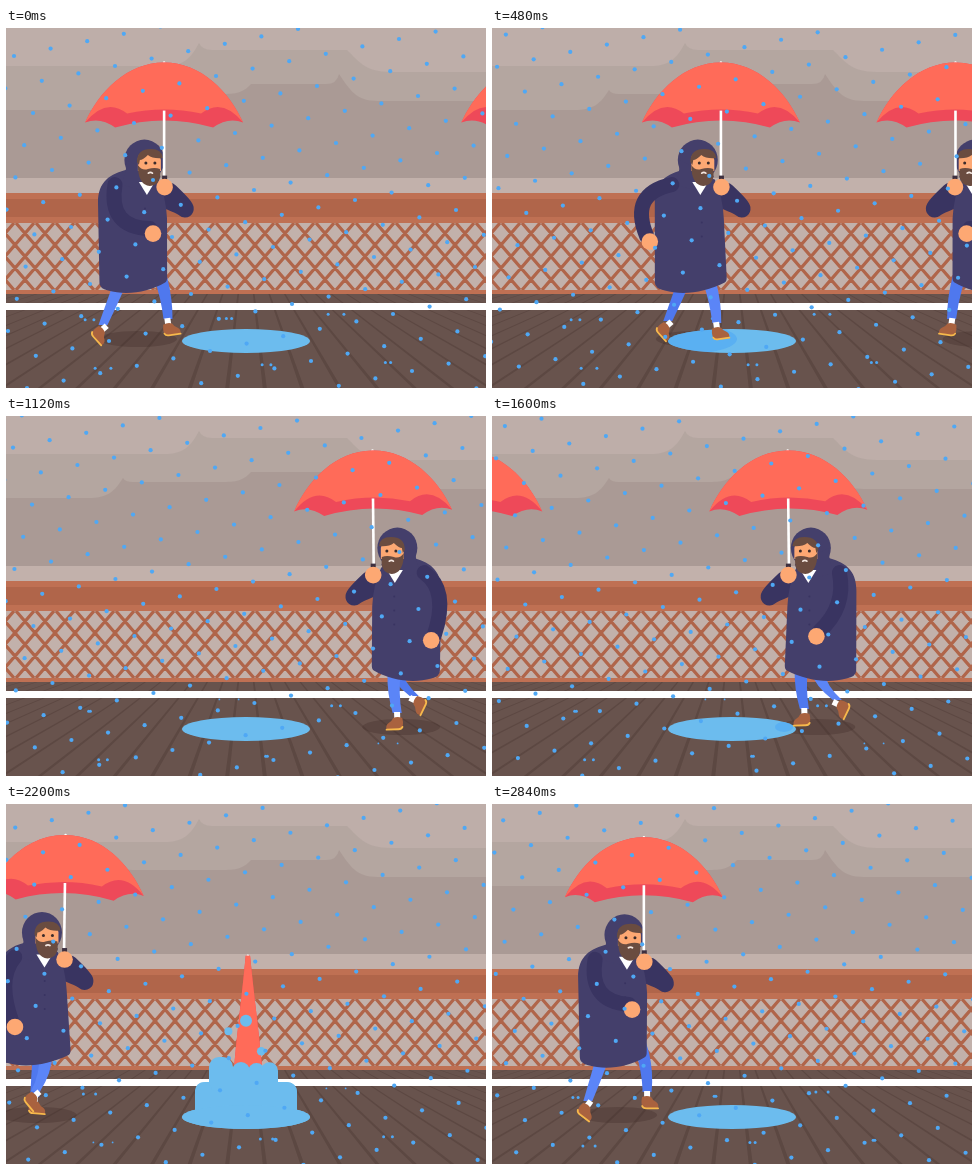
An HTML page with a canvas for the animation above (2.88 s loop, 480 by 360 pixels).

```html
<!DOCTYPE html>
<html lang="en">
<head>
<meta charset="utf-8">
<title>Rainy walk</title>
<style>
  html, body { margin: 0; width: 100%; height: 100%; overflow: hidden; background: #67534d; }
  canvas { display: block; width: 480px; height: 360px; }
</style>
</head>
<body>
<canvas id="stage" width="480" height="360"></canvas>
<script>
const ctx = document.getElementById('stage').getContext('2d');
const LOOP = 2880, FRAME = 40, CYCLE = 960, SPEED = 0.1475;
const WATER = '#6cbcee', RAIN = '#4fa8f5', COAT = '#443f6b', SLEEVE = '#393461',
      SKIN = '#fda873', HAIR = '#6a4c40', WOOD = '#b0654a', TRIM = '#bf7053';

const mod = (a, n) => ((a % n) + n) % n;
const clamp01 = x => Math.min(1, Math.max(0, x));
const lerp = (a, b, k) => a + (b - a) * k;
const smooth = x => { x = clamp01(x); return x * x * (3 - 2 * x); };
const wave = (u, period, shift = 0) => Math.cos(2 * Math.PI * (u - shift) / period);
const walkX = u => Math.min(158 + SPEED * u, 237);

function rect(x, y, w, h, color) {
  ctx.fillStyle = color;
  ctx.fillRect(x, y, w, h);
}
function oval(x, y, rx, ry, color) {
  ctx.fillStyle = color;
  ctx.beginPath();
  ctx.ellipse(x, y, rx, ry, 0, 0, 2 * Math.PI);
  ctx.fill();
}
const dot = (x, y, r, color) => oval(x, y, r, r, color);
function shape(d, color) {
  ctx.fillStyle = color;
  ctx.fill(new Path2D(d));
}
function line(d, width, color, cap = 'round') {
  ctx.lineWidth = width;
  ctx.strokeStyle = color;
  ctx.lineCap = cap;
  ctx.lineJoin = 'round';
  ctx.stroke(new Path2D(d));
}

// Piecewise linear lookup: rows are [time, v1, v2, ...].
function track(p, rows) {
  const i = rows.findIndex((row, n) => n > 0 && p <= row[0]);
  const a = rows[i - 1], b = rows[i], k = (p - a[0]) / (b[0] - a[0]);
  return a.slice(1).map((v, n) => lerp(v, b[n + 1], k));
}

function drawScene() {
  rect(0, 0, 480, 150, '#aa9a95');
  shape('M0 0H480V73H372C350 73 344 62 333 46Q331 56 320 56H245C236 66 228 66 212 66H127Q119 66 117 62C109 74 104 82 82 82H0Z', '#b4a6a0');
  shape('M0 0H480V44H385C358 44 352 32 341 22H206Q196 22 193 15C185 30 178 38 158 38H0Z', '#beaea9');
  rect(0, 150, 480, 115, '#c2b1ab');

  let mesh = '';
  for (let x = -70; x < 500; x += 20) mesh += `M${x} 195l58 67M${x + 58} 195l-58 67`;
  line(mesh, 3.3, WOOD, 'butt');
  rect(0, 165, 480, 30, TRIM);
  rect(0, 171, 480, 18, WOOD);
  rect(0, 262, 480, 5, TRIM);

  rect(0, 266, 480, 94, '#68534d');
  let seams = '';
  for (let i = -30; i <= 30; i++) {
    const top = 240 + (i + .5) * 15.5, bottom = 240 + (i + .5) * 37.5;
    seams += `M${top - .8} 266h1.6L${bottom + 2} 360h-4Z`;
  }
  shape(seams, 'rgba(58,42,38,.26)');
  rect(0, 275, 480, 7, '#fff');
}

function drawLeg(phase, bob, side, color) {
  const [x, y, turn] = track(mod(phase, CYCLE), [
    [0, 0, 297, -8], [80, -8, 299, 0], [320, -38, 299, 5], [480, -57, 299, 48],
    [640, -43, 286, 64], [760, -24, 289, 50], [920, -1, 294, 0], [960, 0, 297, -8]]);
  const hipX = -24, hipY = 212 + bob, bone = 45;
  const dx = x - hipX, dy = y - hipY, d = Math.hypot(dx, dy);
  const bend = Math.sqrt(Math.max(0, bone * bone - d * d / 4));
  const kneeX = hipX + dx / 2 + dy / d * bend, kneeY = hipY + dy / 2 - dx / d * bend;
  ctx.save();
  ctx.translate(4 * side, -2 * side);
  shape(`M${hipX - 8} ${hipY}Q${kneeX - 7} ${kneeY} ${x - 4.5} ${y - 4}` +
    `H${x + 4.5}Q${kneeX + 7} ${kneeY} ${hipX + 8} ${hipY}Z`, color);
  ctx.translate(x, y);
  ctx.rotate(turn * Math.PI / 180);
  rect(-3, -5, 6, 7, '#fff');
  shape('M-5 1Q0 -1 4 1Q6 5 9 6Q12 8 11 12H-3Q-7 10 -5 1Z', '#a9623f');
  line('M-5 10Q-4 12.3 -1 12.3H11', 1.8, '#f7b94c');
  ctx.restore();
}

function drawHead() {
  oval(0, 130, 20, 20.5, COAT);
  shape('M-18 130Q-18 150 -26 154L10 164L16 146Z', COAT);
  ctx.translate(2.5, 0);
  shape('M-8 152H8L0 165Z', '#fff');
  shape('M-9 128Q-8 121 3 121Q13 121 14 130V141H-9Z', SKIN);
  shape('M-10 132Q-10 119 4 119Q15 119 16 128Q6 129 1 125Q-4 130 -7 130L-8 135Z', HAIR);
  shape('M-9 135Q-5 141 1 139Q8 137 13 139Q15 155 3 156Q-9 155 -9 135Z', HAIR);
  dot(-1, 133, 1.5, '#3a2b2b');
  dot(8, 133, 1.5, '#3a2b2b');
  line('M1.5 143Q3.5 141.5 5.5 143', 1.8, '#f4e7e0');
}

// fold: 0 is an open canopy, 1 a closed cone.
function drawUmbrella(fold) {
  const w = lerp(79, 15, fold), rim = lerp(94, 158, fold), tip = 2.2 * fold;
  const k = w / 79, low = y => rim + y - 94, px = x => x * k;
  const sx = lerp(65, 12, fold), sy = lerp(63, 117, fold);
  const cx = lerp(37, 6, fold), cy = lerp(34, 75, fold);
  const dome = `M${-w} ${rim}C${-sx} ${sy} ${-cx} ${cy} ${-tip} 34H${tip}C${cx} ${cy} ${sx} ${sy} ${w} ${rim}`;
  line('M0 33.8V35', 2.4, '#fff');
  shape(`${dome}Q${px(64)} ${low(88)} ${px(49)} ${low(99)}Q0 ${low(85)} ${px(-49)} ${low(99)}` +
    `Q${px(-64)} ${low(88)} ${-w} ${rim}Z`, '#ee4959');
  line(`M0 ${lerp(82, 154, fold)}V152`, 2.6, '#fff', 'butt');
  shape(`${dome}Q${px(58)} ${low(68)} ${px(37)} ${low(85)}Q0 ${low(77)} ${px(-37)} ${low(85)}` +
    `Q${px(-58)} ${low(68)} ${-w} ${rim}Z`, '#ff6b59');
}

function drawWalker(u) {
  if (u > 910) return;
  const step = Math.min(u, 540);
  const bob = -.7 + 2.6 * wave(step, 480, 80);
  const swing = wave(step, CYCLE);
  const poleX = .5 + wave(step, 480, 150);
  const fall = Math.max(0, (u - 500) / 260);
  const bodyDrop = 260 * fall ** 1.5;

  ctx.save();
  if (fall > 0) {
    ctx.beginPath();
    ctx.rect(0, 0, 480, 313);
    ctx.ellipse(240, 313, 64, 12, 0, 0, Math.PI);
    ctx.clip();
  }
  ctx.translate(walkX(u), 0);

  ctx.save();
  ctx.translate(0, bodyDrop);
  drawLeg(step, bob, 1, '#4f78ee');
  drawLeg(step + 480, bob, -1, '#5b85f7');
  ctx.translate(0, bob);
  line('M-10 167Q17 177 21 180.5Q23 179 6 163', 17, SLEEVE);
  const hem = 4.5 + 2.5 * wave(step, CYCLE, 330);
  shape(`M-36 141C-54 145 -66 153 -66 174L${-63 - hem / 2} 254Q${-63 - hem / 2} 260 -56 262` +
    `C-38 267 -16 264 ${hem - 2} 254Q${hem} 253 ${hem} 249L3 190Q2 168 -6 151Z`, COAT);
  for (const y of [180, 194, 208]) dot(-19, y, 1, SLEEVE);
  ctx.save();
  ctx.translate(-21.3 + 1.7 * swing, 1.5);
  drawHead();
  ctx.restore();
  const handX = -41 + 30 * swing, handY = 226 - 17 * swing * swing - 4 * swing;
  const elbowX = -62 + 18 * swing - 12 * swing * swing;
  line(`M-49 156Q${elbowX} ${182 + 17 * swing} ${handX - 3} ${handY - 5}`, 15, SLEEVE);
  dot(handX, handY, 8.3, SKIN);
  ctx.restore();

  ctx.save();
  ctx.translate(poleX, bob + 116 * fall * fall + 150);
  ctx.rotate((1 - wave(step, 480)) * .4 * Math.PI / 180);
  ctx.translate(0, -150);
  drawUmbrella(smooth((u - 550) / 180));
  ctx.restore();

  ctx.translate(poleX, bob + bodyDrop);
  rect(-2, 147, 5, 5, '#3d3040');
  dot(.5, 158.5, 8.3, SKIN);
  ctx.restore();
}

function drawShadow(u) {
  if (u < 500) oval(walkX(u) - 26, 311, 39, 8, 'rgba(60,42,38,.3)');
}

function drawRipple(u) {
  if (u < 140 || u > 640) return;
  ctx.save();
  ctx.beginPath();
  ctx.ellipse(240, 313, 64, 12, 0, 0, 2 * Math.PI);
  ctx.clip();
  ctx.globalAlpha = .6 * clamp01((640 - u) / 160);
  const r = 6 + (u - 140) * .15;
  oval(188, 311, r, 3 + r * .22, RAIN);
  ctx.restore();
}

function drawSplash(u) {
  if (u > 570 && u < 960) {
    const columns = [[189, 102, 35, 0], [189, 18, 35, 15], [208, 17, 55, -10],
                     [221, 17, 54, 0], [236, 18, 55, 0], [253, 24, 60, 5], [274, 17, 35, 15]];
    for (const [x, w, height, lag] of columns) {
      const h = height * Math.sin(Math.PI * clamp01((u - 580 - lag) / 360));
      if (h <= 0) continue;
      const r = Math.min(10, w / 2, h);
      ctx.fillStyle = WATER;
      ctx.beginPath();
      ctx.roundRect(x, 313 - h, w, h + 4, [r, r, 0, 0]);
      ctx.fill();
    }
    oval(240, 313, 64, 12, WATER);
  }
  const s = (u - 600) / 400;
  if (s <= 0 || s >= 1) return;
  for (const [drift, height, r] of [[0, 99, 6], [44, 88, 4], [-38, 67, 4.3]])
    dot(240 + drift * s, 311 - height * Math.sin(Math.PI * s), r, WATER);
}

// Drops bouncing off the boards.
function drawImpacts(frame) {
  for (const [x, y, offset] of [[330, 294, 0], [97, 348, 0], [382, 337, 3],
                                [223, 293, 3], [260.5, 341, -2], [83.5, 296, -2]]) {
    const s = mod(frame + offset - 1.5, 6);
    for (const side of [-1, 1])
      dot(x + side * s * 1.75, y - s * 1.75, s > 5 ? .9 : 1.5, RAIN);
  }
}

// Drops form a slanted grid that slides along its own diagonal.
function drawRain(frame) {
  const shift = mod(frame * 13 / 36, 1);
  for (let m = -16; m <= 18; m++) {
    for (let n = -16; n <= 24; n++) {
      const x = 8 - 36.6 * (m + shift) + 27.8 * (n + shift);
      const y = 28 + 7.4 * (m + shift) + 24.8 * (n + shift);
      if (x > -4 && x < 484 && y > -4 && y < 364) dot(x, y, 2.1, RAIN);
    }
  }
}

// Two men share the puddle: one from the left, one mirrored half a loop later.
function forBoth(t, paint) {
  paint(mod(t + LOOP / 2, LOOP) - LOOP / 2);
  ctx.save();
  ctx.translate(480, 0);
  ctx.scale(-1, 1);
  paint(t - LOOP / 2);
  ctx.restore();
}

function draw(t) {
  drawScene();
  forBoth(t, drawShadow);
  oval(240, 313, 64, 12, WATER);
  forBoth(t, drawRipple);
  drawImpacts(t / FRAME);
  forBoth(t, drawWalker);
  forBoth(t, drawSplash);
  drawRain(t / FRAME);
}

const start = performance.now();
function tick() {
  const elapsed = performance.now() - start;
  draw(Math.floor(elapsed / FRAME) * FRAME % LOOP);
  requestAnimationFrame(tick);
}
tick();
</script>
</body>
</html>
```
